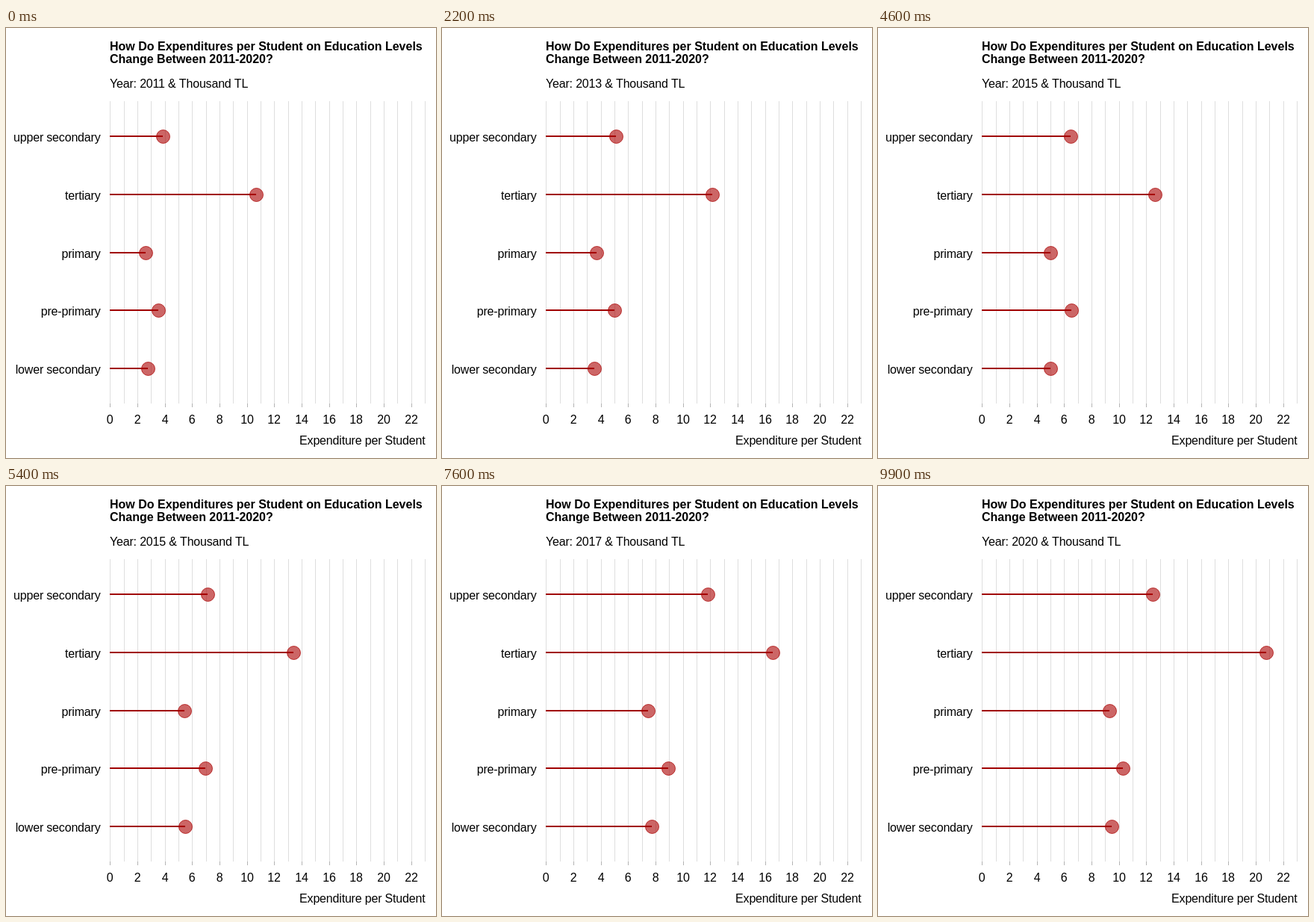
An HTML page with a canvas that plays this animation: 576x576 px, repeating every 10 s.

```html
<!DOCTYPE html>
<html>
<head>
<meta charset="utf-8">
<style>
html, body { margin: 0; width: 100%; height: 100%; overflow: hidden; background: #fff; }
canvas { display: block; }
</style>
</head>
<body>
<canvas id="stage" width="576" height="576"></canvas>
<script>
const ctx = document.getElementById('stage').getContext('2d');
const FONT = '16px "Liberation Sans", Arial, sans-serif';
const STEP = 100, FRAMES = 100, PER_YEAR = 11;

// Turning points only (thousand TL); the years between are linear
const levels = {
  'upper secondary': { 2011: 3.86, 2013: 5.11, 2014: 5.34, 2016: 7.22, 2017: 8.55, 2018: 12.15, 2020: 12.48 },
  'tertiary': { 2011: 10.68, 2012: 11.77, 2013: 12.15, 2014: 12.69, 2015: 12.42, 2016: 13.51, 2017: 13.68, 2018: 16.84, 2020: 20.76 },
  'primary': { 2011: 2.61, 2014: 4.23, 2016: 5.5, 2017: 5.62, 2018: 7.63, 2020: 9.31 },
  'pre-primary': { 2011: 3.53, 2014: 5.76, 2016: 7.03, 2017: 7.3, 2018: 9.09, 2020: 10.29 },
  'lower secondary': { 2011: 2.77, 2013: 3.53, 2016: 5.56, 2017: 5.68, 2018: 7.96, 2020: 9.48 }
};

const toX = value => Math.round(139.2 + 18.34 * value);
const toY = row => Math.round(145 + 77.75 * row);

function valueAt(points, time) {
  const years = Object.keys(points).map(Number);
  const end = Math.max(1, years.findIndex(year => year >= time));
  const a = years[end - 1], b = years[end];
  return points[a] + (points[b] - points[a]) * (time - a) / (b - a);
}

function text(str, x, y, align = 'left', bold = false) {
  ctx.font = (bold ? 'bold ' : '') + FONT;
  ctx.letterSpacing = bold ? '0px' : '-0.18px';
  ctx.textAlign = align;
  ctx.fillStyle = '#000';
  ctx.fillText(str, x, y);
}

function drawAxis() {
  for (let value = 0; value <= 23; value++) {
    const x = toX(value);
    ctx.fillStyle = '#dedede';
    ctx.fillRect(x, 98, 1, 405);
    if (value % 2) continue;
    ctx.fillStyle = '#b3b3b3';
    ctx.fillRect(x, 503, 1, 5);
    text(value, x, 530, 'center');
  }
  text('Expenditure per Student', 561.5, 558, 'right');
}

function drawLevel(name, row, time) {
  const x = toX(valueAt(levels[name], time)), y = toY(row);
  text(name, 126.5, y + 7, 'right');
  ctx.fillStyle = '#a00000';
  ctx.fillRect(139, y - 1, x - 139, 2);
  ctx.beginPath();
  ctx.arc(x + 0.5, y + 0.5, 9, 0, 2 * Math.PI);
  ctx.fillStyle = 'rgba(170, 0, 0, 0.6)';
  ctx.fill();
  ctx.strokeStyle = 'rgba(170, 0, 0, 0.75)';
  ctx.stroke();
}

function draw(now) {
  const time = 2011 + Math.floor(now / STEP) % FRAMES / PER_YEAR;
  ctx.fillStyle = '#fff';
  ctx.fillRect(0, 0, 576, 576);
  text('How Do Expenditures per Student on Education Levels', 139, 30, 'left', true);
  text('Change Between 2011-2020?', 139, 47, 'left', true);
  text(`Year: ${Math.floor(time)} & Thousand TL`, 139, 80);
  drawAxis();
  Object.keys(levels).forEach((name, row) => drawLevel(name, row, time));
  requestAnimationFrame(draw);
}

draw(0);
</script>
</body>
</html>
```
